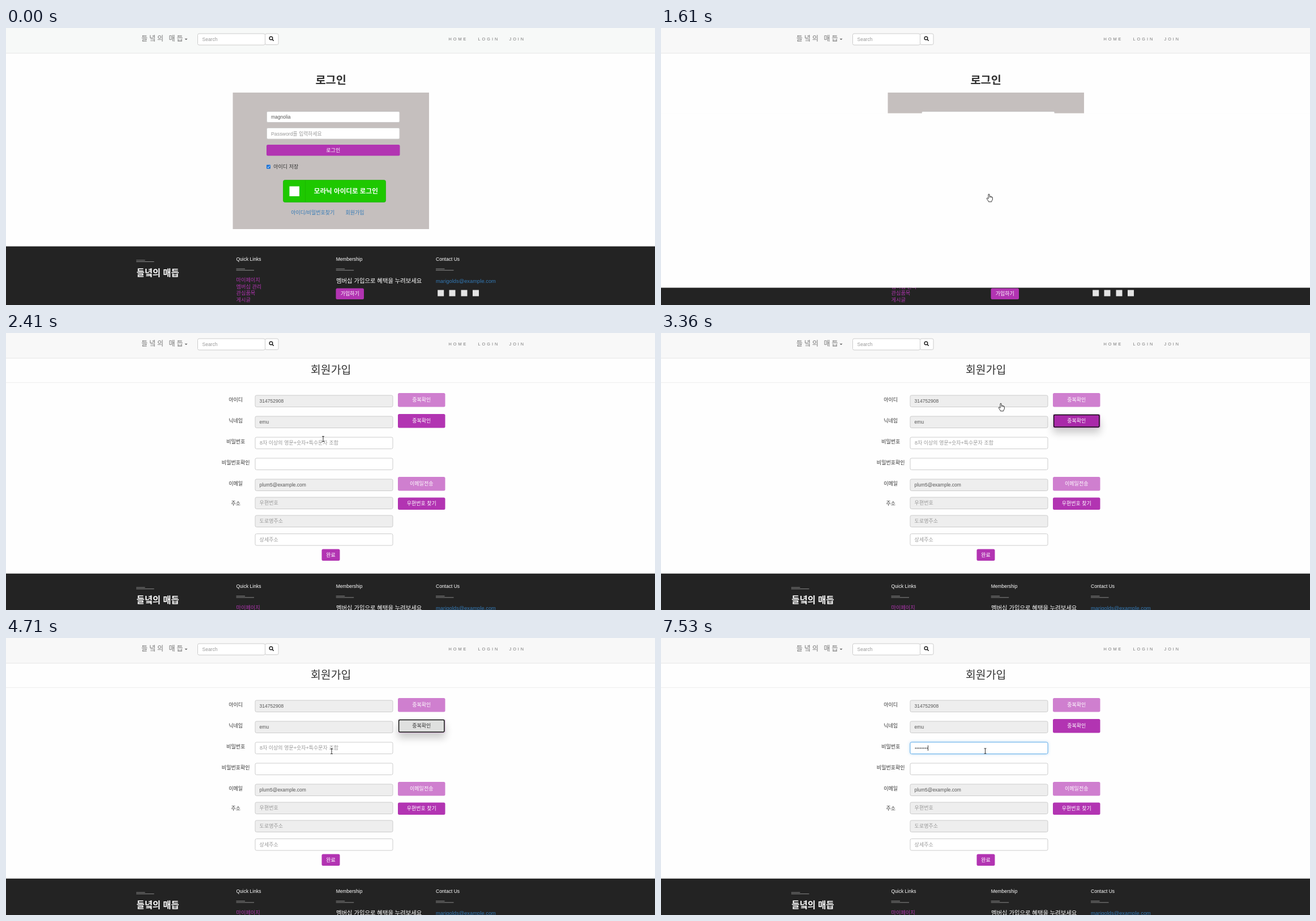
Animation of 1146 by 489 pixels, one loop 8000 ms. Source, as an HTML page with a canvas:

```html
<!DOCTYPE html>
<html lang="ko">
<head>
<meta charset="utf-8">
<title>회원가입</title>
<style>
html, body { margin: 0; width: 100%; height: 100%; overflow: hidden; background: #fefefe; }
canvas { display: block; }
</style>
</head>
<body>
<canvas id="stage" width="1146" height="489"></canvas>
<script>
const ctx = document.getElementById('stage').getContext('2d');
const W = 1146, H = 489, LOOP = 8000;
const FONT = '"Liberation Sans", "Noto Sans CJK KR", "Noto Sans CJK", sans-serif';
const PURPLE = '#b234b2', PALE = '#cf7fcf', BLUE = '#337ab7', PAGE = '#fefefe';
const BRAND = '들녘의 매듭';

const clamp = v => Math.max(0, Math.min(1, v));
const ramp = (t, a, b) => clamp((t - a) / (b - a));

function text(s, x, y, size, color, { align = 'left', weight = 400, gap = 0 } = {}) {
  ctx.font = `${weight} ${size}px ${FONT}`;
  ctx.letterSpacing = gap + 'px';
  ctx.textAlign = align;
  ctx.fillStyle = color;
  ctx.fillText(s, x, y);
}

function rect(x, y, w, h, color) {
  ctx.fillStyle = color;
  ctx.fillRect(x, y, w, h);
}

function box(x, y, w, h, fill, stroke, r = 2.5, line = 1) {
  ctx.beginPath();
  ctx.roundRect(x, y, w, h, r);
  if (fill) { ctx.fillStyle = fill; ctx.fill(); }
  if (stroke) { ctx.strokeStyle = stroke; ctx.lineWidth = line; ctx.stroke(); }
}

function withShadow(color, blur, dy, draw) {
  ctx.save();
  ctx.shadowColor = color;
  ctx.shadowBlur = blur;
  ctx.shadowOffsetY = dy;
  draw();
  ctx.restore();
}

function button(x, y, w, h, label, fill, textY, color = '#fff') {
  box(x, y, w, h, fill);
  text(label, x + w / 2, textY, 9, color, { align: 'center' });
}

function poly(points, fill, stroke, line = 0.9) {
  ctx.beginPath();
  points.forEach(([x, y]) => ctx.lineTo(x, y));
  ctx.closePath();
  ctx.fillStyle = fill;
  ctx.fill();
  if (stroke) {
    ctx.strokeStyle = stroke;
    ctx.lineWidth = line;
    ctx.lineJoin = 'round';
    ctx.stroke();
  }
}

function navbar(dx, bg) {
  rect(0, 0, W, 44, bg);
  rect(0, 44, W, 1, '#e7e7e7');
  ctx.save();
  ctx.translate(dx, 0);
  text(BRAND, 239, 23, 12, '#777', { gap: 3 });
  poly([[315.5, 18.8], [320.5, 18.8], [318, 21.3]], '#666');
  box(338.5, 10, 119, 20, '#fff', '#ccc');
  box(457.5, 10, 23.5, 19.5, '#fff', '#ccc');
  text('Search', 346.5, 23, 8.5, '#999');
  ctx.strokeStyle = '#222';
  ctx.lineWidth = 1.5;
  ctx.beginPath();
  ctx.arc(468, 18, 2.8, 0, 7);
  ctx.moveTo(470, 20);
  ctx.lineTo(472.7, 22.6);
  ctx.stroke();
  [['HOME', 781.5], ['LOGIN', 833.5], ['JOIN', 888.5]].forEach(([s, x]) =>
    text(s, x, 22, 7.3, '#777', { gap: 3 }));
  ctx.restore();
}

function rule(x, y) {
  rect(x, y, 15.5, 1, '#8a8a8a');
  rect(x, y + 2.5, 31.5, 1, '#8a8a8a');
}

function footer(top) {
  ctx.save();
  ctx.translate(0, top);
  rect(0, 0, W, H, '#232323');
  rule(230, 24);
  text(BRAND, 230.5, 52, 15.4, '#fff', { weight: 700 });
  [['Quick Links', 406.5], ['Membership', 582.7], ['Contact Us', 759]].forEach(([s, x]) => {
    text(s, x, 25.3, 8.5, '#fff');
    rule(x, 39.2);
  });
  ['마이페이지', '멤버십 관리', '관심품목', '게시글'].forEach((s, i) =>
    text(s, 406.5, 62.9 + i * 11.5, 9.2, '#b035b0'));
  text('멤버십 가입으로 혜택을 누려보세요', 583, 64.4, 10.35, '#fff');
  button(582.5, 74, 49.5, 19.5, '가입하기', PURPLE, 86.8);
  text('marigolds@example.com', 759, 64, 9.4, BLUE);
  [767.7, 788, 809, 829.5].forEach(x => rect(x - 5.5, 77, 11, 11, '#e4e4e4'));
  ctx.restore();
}

function loginPage(bg) {
  rect(0, 0, W, H, PAGE);
  navbar(0, bg);
  text('로그인', 573.7, 98.5, 19.8, '#333', { align: 'center', weight: 700 });
  rect(400.5, 114, 346.5, 241, '#c5bfbe');
  box(460.5, 147.5, 234.5, 19, '#fff', '#ccc', 2);
  text('magnolia', 468, 160, 8.5, '#555');
  box(460.5, 176.5, 234.5, 19.5, '#fff', '#ccc', 2);
  text('Password를 입력하세요', 468, 189.5, 8.8, '#999');
  button(460, 206, 235.5, 19.5, '로그인', PURPLE, 218.5);
  box(460, 241.5, 7, 7, '#1a73d8', null, 1);
  ctx.beginPath();
  ctx.moveTo(461.4, 245);
  ctx.lineTo(463, 246.7);
  ctx.lineTo(465.8, 243.3);
  ctx.strokeStyle = '#fff';
  ctx.lineWidth = 1;
  ctx.stroke();
  text('아이디 저장', 472.3, 248.2, 9, '#333');
  box(489.5, 268.5, 181, 39, '#1ec800', '#1ab000', 3, 0.7);
  rect(528, 269, 1, 38, '#1bb800');
  rect(500.5, 279.5, 17.5, 17.5, '#fff');
  text('모라닉 아이디로 로그인', 600.3, 292.3, 11.6, '#fff', { align: 'center', weight: 700 });
  text('아이디/비밀번호찾기', 503.3, 328.7, 9, BLUE);
  text('회원가입', 599.5, 328.7, 9, BLUE);
  footer(385.5);
}

const LABELS = [['아이디', 118], ['닉네임', 155], ['비밀번호', 192], ['비밀번호확인', 229], ['이메일', 266], ['주소', 300.5]];
// top, value, placeholder, read-only
const FIELDS = [
  [110, '314752908', '', 1],
  [147, 'emu', '', 1],
  [184, '', '8자 이상의 영문+숫자+특수문자 조합', 0],
  [221, '', '', 0],
  [258, 'plum5@example.com', '', 1],
  [290, '', '우편번호', 1],
  [322, '', '도로명주소', 1],
  [354.5, '', '상세주소', 0]
];
const KEYS = [5720, 5910, 6110, 6330, 6530, 7000, 7270, 7460];
const CLICK = 3160, CLOSE = 4230, FOCUS = 4960;

function nickButton(t, x, w) {
  const glow = ramp(t, 2720, 2960) * (1 - ramp(t, FOCUS, FOCUS + 240));
  if (glow > 0)
    withShadow(`rgba(0,0,0,${0.2 * glow})`, 14, 9, () => box(x, 143, w, 24.5, PURPLE));
  const focused = t >= CLICK && t < FOCUS;
  if (!focused) return button(x, 143, w, 24.5, '중복확인', PURPLE, 158);
  const gray = t >= CLOSE;
  box(x, 143, w, 24.5, gray ? '#f4f4f4' : '#e3c6e3');
  button(x + 1, 144, w - 2, 22.5, '중복확인', gray ? '#dfe0df' : '#a929a9', 158, gray ? '#333' : '#fff');
  box(x + 1.6, 144.6, w - 3.2, 21.3, null, '#111', 2, 1.5);
}

function passwordField(t, x, w, hint) {
  const k = ramp(t, FOCUS, FOCUS + 150);
  if (k > 0) {
    withShadow(`rgba(102,175,233,${0.7 * k})`, 5, 0, () => box(x, 184, w, 20.5, '#fff'));
    box(x, 184, w, 20.5, '#fff', k < 1 ? '#99bfdb' : '#66afe9');
  } else box(x, 184, w, 20.5, '#fff', '#ccc');
  const typed = KEYS.filter(key => key <= t).length;
  const start = x + 8, step = 2.9;
  if (!typed) text(hint, start, 197.3, 9, '#999');
  ctx.fillStyle = '#444';
  for (let i = 0; i < typed; i++) {
    ctx.beginPath();
    ctx.arc(start + step * (i + 0.5), 194.4, 1, 0, 7);
    ctx.fill();
  }
  const since = t - (typed ? KEYS[typed - 1] : FOCUS);
  if (since >= 0 && since % 1060 < 540) rect(start + step * typed - 0.2, 189.5, 0.9, 9.5, '#222');
}

function joinPage(t, wide) {
  rect(0, 0, W, H, PAGE);
  navbar(wide * 5.4, '#f8f8f8');
  text('회원가입', 573.7 + wide * 5.4, 71.5, 19.4, '#333', { align: 'center' });
  rect(0, 87, W, 1, '#eee');
  LABELS.forEach(([s, y]) =>
    text(s, 405.7 + wide * 4, y + 3.3, 9, '#333', { align: 'center' }));
  const x = 440 + wide * 4.4, w = 243 + wide * 2.4;
  FIELDS.forEach(([y, value, hint, locked], i) => {
    if (i === 2) return passwordField(t, x, w, hint);
    box(x, y, w, 20.5, locked ? '#eee' : '#fff', '#ccc');
    text(value || hint, x + 7.6, y + 13.4, value ? 8.5 : 9, value ? '#555' : '#999');
  });
  const bx = 692 + wide * 6.9, bw = 83.5 + wide * 0.3;
  button(bx, 106, bw, 24.5, '중복확인', PALE, 121);
  nickButton(t, bx, bw);
  button(bx, 254, bw, 24.5, '이메일전송', PALE, 269);
  button(bx, 290.5, bw, 21.5, '우편번호 찾기', PURPLE, 304.3);
  button(557.5 + wide * 5.4, 381.5, 32, 20.5, '완료', PURPLE, 394.8);
  if (!wide) footer(424.7);
}

function dialog() {
  withShadow('rgba(0,0,0,.3)', 9, 2, () => box(438, 0, 270, 78, '#fff', null, [0, 0, 4, 4]));
  text('localhost:8080 내용:', 449, 18, 9.2, '#222');
  text('사용 가능한 닉네임입니다.', 449, 37, 8.2, '#555');
  button(662, 53, 36, 17, '확인', '#1a73e8', 64.7);
}

// time, x, y of the pointer
const PATH = [
  [70, 897, 443], [510, 579, 293], [770, 579, 293], [840, 581, 286], [910, 581, 286],
  [980, 579, 293], [1380, 579, 292], [1520, 579, 293], [1680, 579, 293], [1880, 580, 294],
  [2280, 543, 190], [2980, 728, 157], [3160, 728, 157], [3360, 600, 124], [3560, 612, 105],
  [3950, 680, 62], [4230, 680, 62], [4710, 575, 200], [6330, 575, 199], [6800, 572.5, 199.5]
];
const SHAPES = [[70, 'arrow'], [440, 'hand'], [1380, 'arrow'], [1520, 'hand'], [1750, 'beam'],
  [2720, 'hand'], [3700, 'arrow'], [4600, 'beam']];

const POINTERS = {
  arrow() {
    poly([[0, 0], [0, 10.8], [2.5, 8.5], [4.2, 12.4], [6, 11.6], [4.3, 7.9], [7.6, 7.7]], '#fff', '#222');
  },
  hand() {
    poly([[-1, 0.8], [0, 0], [1, 0.8], [1.2, 4.3], [3, 4.2], [4.8, 5], [6.3, 5.8], [6.4, 10],
      [5, 12.2], [4.8, 13.8], [-0.6, 13.8], [-1.2, 12], [-3.8, 8.5], [-3.5, 7.2], [-2.4, 7.2], [-1, 8.5]],
      '#fff', '#222');
    ctx.beginPath();
    [1.2, 3, 4.8].forEach(x => { ctx.moveTo(x, 4.6); ctx.lineTo(x, 6.8); });
    ctx.lineWidth = 0.6;
    ctx.stroke();
  },
  beam() {
    ctx.strokeStyle = '#333';
    ctx.lineWidth = 1;
    ctx.beginPath();
    ctx.moveTo(-2, -4.5); ctx.lineTo(2, -4.5);
    ctx.moveTo(0, -4.5); ctx.lineTo(0, 4.5);
    ctx.moveTo(-2, 4.5); ctx.lineTo(2, 4.5);
    ctx.stroke();
  }
};

function pointer(t) {
  if (t < PATH[0][0]) return;
  const i = PATH.findLastIndex(p => p[0] <= t);
  const a = PATH[i], b = PATH[i + 1] || a;
  const k = a === b ? 0 : ramp(t, a[0], b[0]);
  const e = k * k * (3 - 2 * k);
  ctx.save();
  ctx.translate(a[1] + (b[1] - a[1]) * e, a[2] + (b[2] - a[2]) * e);
  POINTERS[SHAPES.findLast(s => s[0] <= t)[1]]();
  ctx.restore();
}

function draw(t) {
  if (t < 1520) loginPage('#f7f9f8');
  else if (t < 1680) {
    loginPage('#f8f8f8');
    rect(0, 150.5, W, 308, PAGE);
  } else joinPage(t, t < 1950 ? 1 : 0);
  if (t >= 3430 && t < CLOSE) dialog();
  pointer(t);
}

const start = performance.now();
function tick() {
  draw((performance.now() - start) % LOOP);
  requestAnimationFrame(tick);
}
tick();
</script>
</body>
</html>
```
